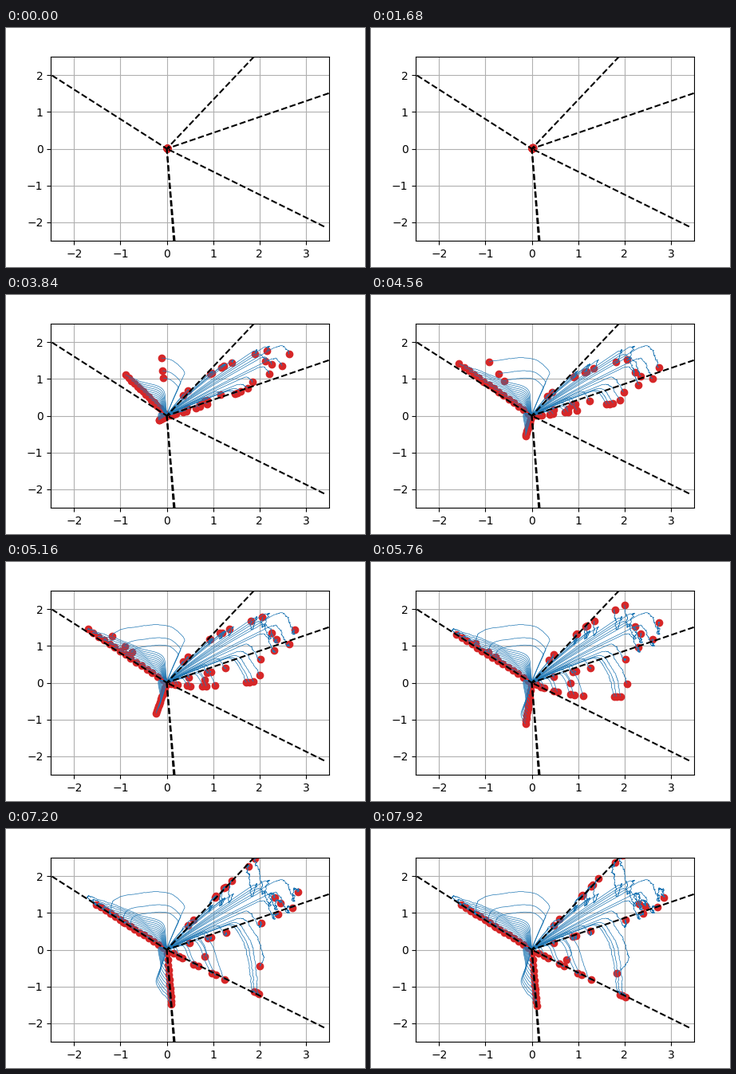
Recreate the animation shown at these times as a matplotlib script. Size 450 by 300 pixels, loop 8 s.

```python
import numpy as np
import matplotlib.pyplot as plt
from matplotlib.animation import FuncAnimation
from matplotlib.collections import LineCollection

LOOP, TICK, HOLD, STEP = 8000, 40, 120, 12
time = np.arange(0, LOOP, STEP)
rng = np.random.default_rng(4)

RAYS = [(-2.5, 2.01), (1.88, 2.5), (3.5, 1.51), (3.4, -2.12),
        (0.17, -2.5), (0.15, -2.5)]
SPREAD, SETTLED = 3120, 7920  # first burst is over / all at rest
TURNS = [SPREAD, 4560, 5760, 6600, SETTLED]


def burst(t):
    def rise(u):
        return 1 / (1 + np.exp((2600 - u) / 190))
    return rise(t) / rise(SPREAD)


def creep(t):
    return np.exp((t - SPREAD) / 280)


def walk(rho=0.93):
    """Mean-reverting random walk in the plane with unit variance."""
    kicks = rng.normal(size=(len(time), 2)) * np.sqrt(1 - rho * rho)
    out = np.zeros_like(kicks)
    for i in range(1, len(time)):
        out[i] = rho * out[i - 1] + kicks[i]
    return out


def trace(pts, knots, grow, shared):
    """Growth from the origin, then a smooth, jittered curve through pts."""
    slope = np.gradient(pts, knots, axis=0)
    slope[0] = pts[0] * (grow(SPREAD) - grow(SPREAD - 10)) / 10

    i = np.clip(np.searchsorted(knots, time, "right") - 1, 0, len(knots) - 2)
    h = (knots[i + 1] - knots[i])[:, None]
    s = (time - knots[i])[:, None] / h
    path = ((1 + 2 * s) * (1 - s) ** 2 * pts[i] + s * (1 - s) ** 2 * h * slope[i]
            + s * s * (3 - 2 * s) * pts[i + 1] + s * s * (s - 1) * h * slope[i + 1])

    # Jitter grows with distance and fades out at the turns
    reach = np.sum(path ** 2, axis=1, keepdims=True)
    pin = np.sqrt(np.abs(np.sin(np.pi * s)))
    path = path + 0.003 * reach * pin * (0.8 * shared + 0.4 * walk())

    early = time < SPREAD
    g = grow(time[early])
    path[early] = np.column_stack([pts[0, 0] * g, pts[0, 1] * g ** 0.9])
    return path


def family(sizes, shape, grow=burst, knots=TURNS, tilts=None, bend=0):
    """Particles that follow one shape, scaled by size and bent by tilt."""
    knots = np.array(knots, float)
    shape, bend = np.array(shape), np.array(bend)
    tilts = np.zeros(len(sizes)) if tilts is None else tilts
    shared = walk()
    return [trace(size * (shape + tilt * bend), knots, grow, shared)
            for size, tilt in zip(sizes, tilts)]


upper = np.array([1.95, 1.79, 1.44, 1.31, 1.28, 1.1, 1.08, 0.6, 0.48])
lower = np.array([2.02, 1.95, 1.9, 1.28, 1.08, 0.99, 0.69, 0.6, 0.35, 0.27, 0.15])
left = np.linspace(1.53, 0.07, 15)
down = 1.52 * np.linspace(1, 0.03, 12) ** 0.8

paths = np.array(
    family(upper, [(.93, 1), (.93, .89), (.94, 1.16), (.95, 1.27), (1, 1.34)],
           tilts=0.25 * (upper - 1.45),
           bend=[(1, -.5), (1, -.9), (.7, -.6), (.2, -.3), (0, -.2)])
    # far right, hovering around the shallow ray
    + family([2.85, 2.32, 2.45, 2.71, 2.4],
             [(.8, .53), (.96, .35), (.96, .4), (.985, .4), (1, .41)],
             tilts=[.11, .16, .09, .02, 0],
             bend=[(0, 1), (0, 1), (0, 1.6), (0, 1.6), (0, .8)])
    + family([2.02, 1.27, 0.95, 0.88, 0.48],
             [(.8, .5), (.98, .32), (1, .32), (1.01, .34), (1, .4)])
    + family(lower, [(.61, .29), (.79, .13), (.89, -.25), (.95, -.55), (1, -.64)],
             tilts=0.5 * (lower - 1.5),
             bend=[(.25, .25), (.3, .15), (.22, .25), (.05, .15), (0, 0)])
    # late to fall
    + family([2.44, 1], [(.61, .34), (.78, .175), (.84, -.01), (.855, -.115), (.75, -.26)])
    # arcs swinging over to the left
    + family([1.2, 0.93, 0.78],
             [(.32, .95), (.1, 1.25), (-.77, 1.22), (-1.01, .89), (-1.01, .82), (-1, .8)],
             knots=[SPREAD, 3600] + TURNS[1:])
    + family(left,
             [(-.24, .37), (-.4, .62), (-1.025, .92), (-1.12, .95),
              (-1.06, .855), (-1.013, .81), (-1, .8)],
             creep, [SPREAD, 3600, 4560, 5100, 5760, 6600, SETTLED],
             tilts=left, bend=[(.14, 0)] + [(0, 0)] * 6)
    + family(down,
             [(-.07, .04), (-.09, -.36), (-.15, -.59), (-.09, -.735),
              (.033, -.92), (.07, -1)],
             creep, [SPREAD, 4560, 5300, 5760, 6600, SETTLED])
)

fig, ax = plt.subplots(figsize=(4.5, 3), dpi=100)
ax.set_xlim(-2.5, 3.5)
ax.set_ylim(-2.5, 2.5)
ax.grid()
for x, y in RAYS:
    k = 4 / np.hypot(x, y)
    ax.plot([k * x, 0], [k * y, 0], "k--")
dots = ax.scatter(paths[:, 0, 0], paths[:, 0, 1], color="tab:red", zorder=1.7)
trails = LineCollection([], colors="tab:blue", linewidths=0.5, zorder=1.9)
ax.add_collection(trails, autolim=False)


def draw(n):
    k = n * TICK // HOLD * HOLD // STEP
    dots.set_offsets(paths[:, k])
    trails.set_segments(paths[:, :k + 1])
    return dots, trails


anim = FuncAnimation(fig, draw, frames=LOOP // TICK, interval=TICK,
                     init_func=lambda: draw(0), repeat=True, repeat_delay=0)
plt.show()
```
